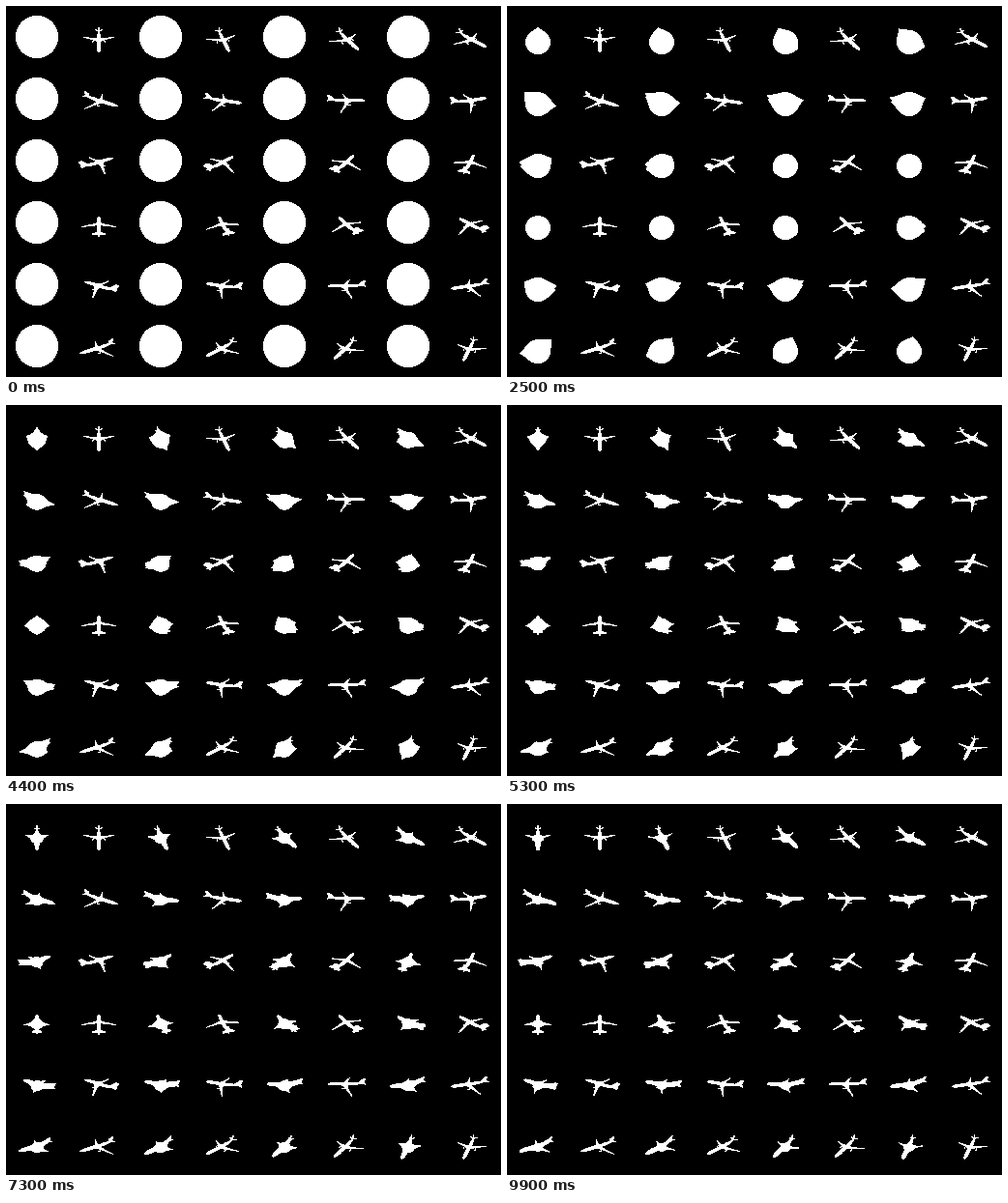
An HTML page with a canvas for the animation above (10 s loop, 512 px wide and 384 px high).

```html
<!DOCTYPE html>
<html lang="en">
<head>
<meta charset="utf-8">
<title>Sphere to plane</title>
<style>
html, body { margin: 0; width: 100%; height: 100%; overflow: hidden; background: #000; }
canvas { display: block; width: 512px; height: 384px; }
</style>
</head>
<body>
<canvas id="stage" width="512" height="384"></canvas>
<script>
const ctx = document.getElementById('stage').getContext('2d', { willReadFrequently: true });
const STEP = 100, STEPS = 100, CELL = 64, VIEWS = 24;
const DIST = 2.732, FOCAL = 32 / Math.tan(Math.PI / 6);
const TILT_SIN = 0.5, TILT_COS = Math.sqrt(0.75);

// Points are [forward, sideways, up]; paired surfaces are mirrored.
const WING = [[.24, .04, -.14], [.05, .32, -.14], [-.2, .84, -.13], [-.23, .84, -.13], [-.08, .32, -.14], [-.06, .04, -.14]];
const STAB = [[-.72, .02, -.02], [-.86, .24, .02], [-.93, .24, .02], [-.88, .02, -.02]];
const FIN = [[-.6, 0, -.02], [-.84, 0, .22], [-.96, 0, .22], [-.88, 0, -.02]];
const TIPS = [[.95, 0, -.09], [-.93, 0, -.03], [-.92, 0, .21]];
const WING_TIPS = [[-.2, .84, -.13], [-.2, -.84, -.13]];

const settle = (t, tau) => 1 - Math.exp(-t / tau);
const widen = (points, k) => points.map(([f, s, u]) => [f, s * k, u]);

// Perspective projection, relative to the cell centre.
function project([f, s, u], angle) {
  const x = f * Math.sin(angle) + s * Math.cos(angle);
  const z = f * Math.cos(angle) - s * Math.sin(angle);
  const k = FOCAL / (DIST - u * TILT_SIN - z * TILT_COS);
  return { x: x * k, y: (z * TILT_SIN - u * TILT_COS) * k, k };
}

function surface(points, angle) {
  ctx.beginPath();
  for (const p of points) {
    const q = project(p, angle);
    ctx.lineTo(q.x, q.y);
  }
  ctx.closePath();
  ctx.fill();
  ctx.stroke();
}

function ball(point, radius, angle) {
  const q = project(point, angle);
  ctx.beginPath();
  ctx.arc(q.x, q.y, radius * q.k, 0, 7);
  ctx.fill();
}

function bodyRadius(f) {
  if (f > .6) return .078 * Math.sqrt(Math.max(0, 1 - ((f - .6) / .37) ** 2));
  if (f < -.35) return .078 - .055 * (-.35 - f) / .6;
  return .078;
}

function drawPlane(angle, span = 1, girth = 1) {
  for (let f = -.93; f < .96; f += .03) {
    ball([f, 0, f < -.35 ? -.1 + .1 * (-.35 - f) : -.1], bodyRadius(f) * girth, angle);
  }
  for (const side of [-span, span]) {
    for (let f = .08; f < .22; f += .03) ball([f, side * .3, -.19], .026, angle);
    surface(widen(WING, side), angle);
    surface(widen(STAB, side), angle);
  }
  surface(FIN, angle);
}

// Shrinking core with spikes that reach for the ends of the plane.
function drawBlob(angle, t) {
  const core = 4 + 18 * Math.exp(-t / 3.6);
  const cy = 5.6 * settle(t, .4) - 2.1 * settle(Math.max(0, t - 2.5), 2);
  const squash = 1 - .17 * settle(t, 5) * Math.min(1, t / 4);
  const spread = .1 + .28 * Math.exp(-t / 3.5);
  const span = .7 + .012 * t;

  const spikes = [...TIPS, ...widen(WING_TIPS, span)].map(p => {
    const q = project(p, angle);
    return { a: Math.atan2(q.y - cy, q.x), d: Math.hypot(q.x, q.y - cy) };
  });

  ctx.beginPath();
  for (let i = 0; i < 240; i++) {
    const a = i * Math.PI / 120;
    const base = core * squash / Math.hypot(squash * Math.cos(a), Math.sin(a));
    let r = base;
    for (const s of spikes) {
      const gap = Math.abs(Math.atan2(Math.sin(a - s.a), Math.cos(a - s.a)));
      r = Math.max(r, base + (s.d - base) * Math.exp(-gap / spread));
    }
    ctx.lineTo(r * Math.cos(a), cy + r * Math.sin(a));
  }
  ctx.closePath();
  ctx.fill();

  if (t > 1) {
    const scale = 1 - .6 * Math.exp(-t / 3);
    ctx.translate(0, cy * (1 - scale));
    ctx.scale(scale, scale);
    drawPlane(angle, span, 1.3);
  }
}

function inCell(col, row, draw) {
  ctx.save();
  ctx.translate((col + .5) * CELL, (row + .5) * CELL);
  draw();
  ctx.restore();
}

// Silhouettes have hard edges: every pixel is black or white.
function harden() {
  const image = ctx.getImageData(0, 0, 512, 384), d = image.data;
  for (let i = 0; i < d.length; i += 4) d[i] = d[i + 1] = d[i + 2] = d[i] > 127 ? 255 : 0;
  ctx.putImageData(image, 0, 0);
}

function render(t) {
  ctx.fillStyle = '#000';
  ctx.fillRect(0, 0, 512, 384);
  ctx.fillStyle = ctx.strokeStyle = '#fff';
  ctx.lineWidth = .6;
  ctx.lineJoin = 'round';
  for (let v = 0; v < VIEWS; v++) {
    const angle = v * Math.PI / 12, col = v % 4 * 2, row = Math.floor(v / 4);
    inCell(col, row, () => drawBlob(angle, t));
    inCell(col + 1, row, () => drawPlane(angle));
  }
  harden();
}

const start = performance.now();
let shown = -1;
function tick() {
  const step = Math.floor((performance.now() - start) / STEP) % STEPS;
  if (step !== shown) render((shown = step) * STEP / 1000);
  requestAnimationFrame(tick);
}
tick();
</script>
</body>
</html>
```
